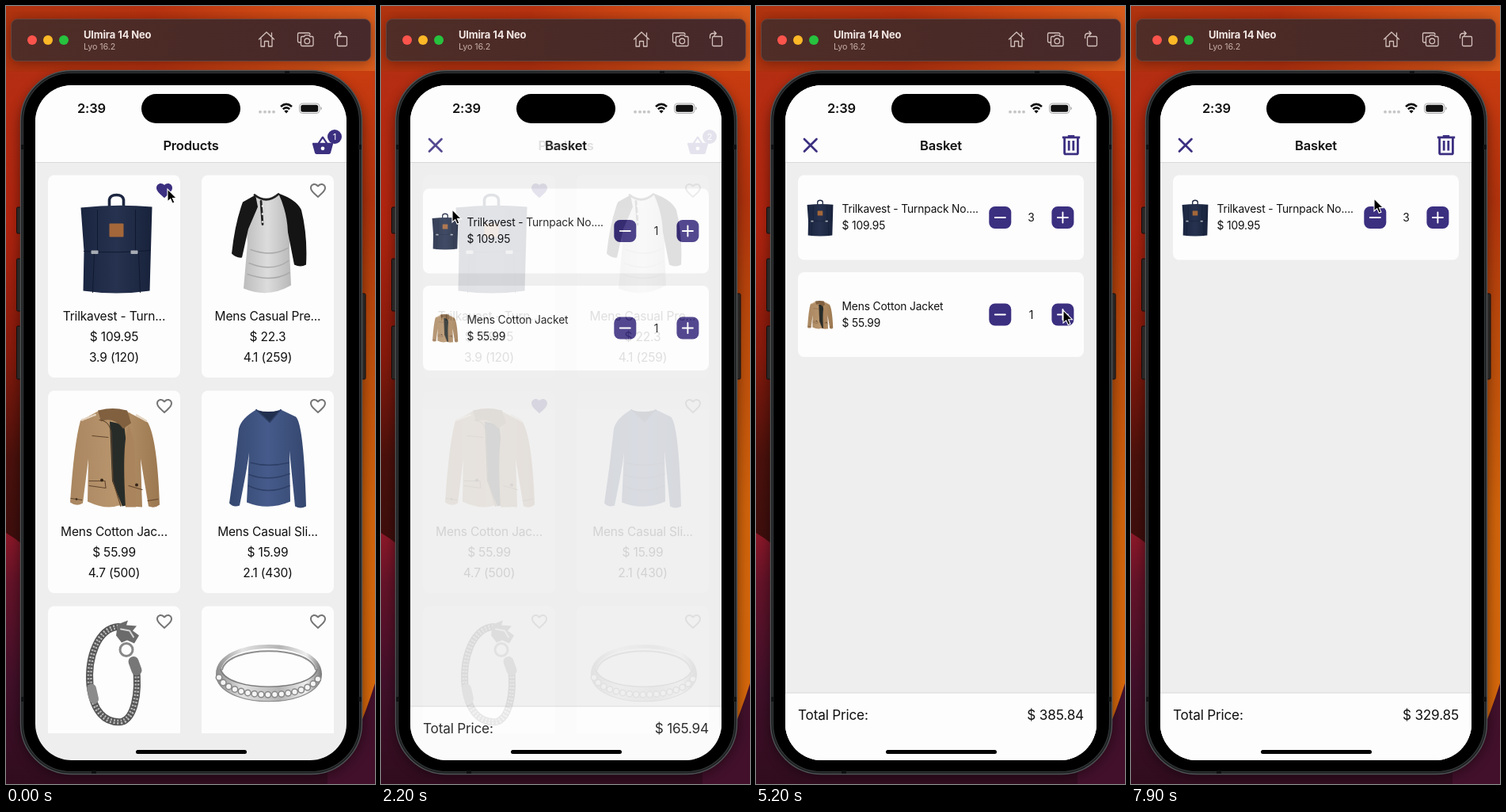
Animation of 466 by 982 pixels, one loop 8 s. Source, as an HTML page:

```html
<!DOCTYPE html>
<html lang="en">
<head>
<meta charset="utf-8">
<title>Shop app</title>
<style>
html, body { margin: 0; width: 100%; height: 100%; overflow: hidden; background: #2d0c20; }
svg { display: block; width: 466px; height: 982px; }
text { font-family: Inter, "Liberation Sans", sans-serif; font-size: 15.5px; letter-spacing: -.011em; fill: #111; }
.mid { text-anchor: middle; }
.end { text-anchor: end; }
.bold { font-weight: 600; font-size: 16.5px; }
.small { font-size: 13.8px; }
.total { font-size: 17.2px; }
.line { fill: none; stroke-linecap: round; stroke-linejoin: round; }
</style>
</head>
<body>
<svg id="stage" viewBox="0 0 466 982"></svg>
<script>
const PURPLE = '#3b2f80', WHITE = '#fdfdfd', GREY = '#eee';
const rect = (x, y, w, h, r, fill, more = '') =>
  `<rect x="${x}" y="${y}" width="${w}" height="${h}" rx="${r}" fill="${fill}" ${more}/>`;
const dot = (x, y, r, fill, more = '') => `<circle cx="${x}" cy="${y}" r="${r}" fill="${fill}" ${more}/>`;
const path = (d, fill, more = '') => `<path d="${d}" fill="${fill}" ${more}/>`;
const line = (d, color, width, more = '') =>
  `<path class="line" d="${d}" stroke="${color}" stroke-width="${width}" ${more}/>`;
const text = (x, y, s, cls = '', more = '') => `<text x="${x}" y="${y}" class="${cls}" ${more}>${s}</text>`;
const group = (more, ...parts) => `<g ${more}>${parts.join('')}</g>`;
const gradient = (id, dir, stops) => `<linearGradient id="${id}" ${dir}>` +
  stops.map(([o, c, a = 1]) => `<stop offset="${o}" stop-color="${c}" stop-opacity="${a}"/>`).join('') +
  '</linearGradient>';
const DOWN = 'x2="0" y2="1"';

const HEART = 'M12 21.35l-1.45-1.32C5.4 15.36 2 12.28 2 8.5 2 5.42 4.42 3 7.5 3c1.74 0 3.41.81 4.5 2.09C13.09 3.81 14.76 3 16.5 3 19.58 3 22 5.42 22 8.5c0 3.78-3.4 6.86-8.55 11.54z';
const HEART_HOLE = 'M12 18.65l-.1-.1C7.14 14.24 4 11.39 4 8.5 4 6.5 5.5 5 7.5 5c1.54 0 3.04.99 3.57 2.36h1.87C13.46 5.99 14.96 5 16.5 5c2 0 3.5 1.5 3.5 3.5 0 2.89-3.14 5.74-7.9 10.05z';
const BASKET = 'M17.21 9l-4.38-6.56c-.19-.28-.51-.42-.83-.42s-.64.14-.83.43L6.79 9H2c-.55 0-1 .45-1 1l.04.27 2.54 9.27c.23.84 1 1.46 1.92 1.46h13c.92 0 1.69-.62 1.93-1.46l2.54-9.27L23 10c0-.55-.45-1-1-1zM9 9l3-4.4L15 9zm3 8a2 2 0 1 1 0-4 2 2 0 0 1 0 4z';
const TRASH = 'M9 3V4H4V6H5V19A2 2 0 0 0 7 21H17A2 2 0 0 0 19 19V6H20V4H15V3ZM7 6H17V19H7ZM9 8V17H11V8ZM13 8V17H15V8Z';

const defs = '<defs>' +
  gradient('left', DOWN, [[0, '#a83212'], [.1, '#b52d12'], [.28, '#b0240f'], [.45, '#861a0c'], [.58, '#4c110c'], [.7, '#3c0e0d']]) +
  gradient('right', DOWN, [[0, '#d5500f'], [.1, '#c63a10'], [.25, '#b2330d'], [.42, '#bc4c0c'], [.65, '#d2640c'], [.9, '#d8690c']]) +
  gradient('top', '', [[0, '#b0330f'], [.4, '#b5310f'], [.75, '#d04a14'], [1, '#d95c1c']]) +
  gradient('plum', DOWN, [[0, '#8d1828'], [.2, '#651329'], [.6, '#42102a'], [1, '#300c1e']]) +
  gradient('bar', '', [[0, '#502d27'], [.5, '#4a2a26'], [1, '#47292c']]) +
  gradient('navy', '', [[0, '#1a2540'], [.5, '#26324f'], [1, '#18223b']]) +
  gradient('tan', '', [[0, '#a98660'], [.5, '#b8956d'], [1, '#9c7850']]) +
  gradient('blue', '', [[0, '#34476f'], [.5, '#465b8b'], [1, '#35476f']]) +
  gradient('cloth', '', [[0, '#bcbcbc'], [.5, '#dcdcdc'], [1, '#b8b8b8']]) +
  gradient('silver', '', [[0, '#8b8b8b'], [.25, '#e2e2e2'], [.6, '#b4b4b4'], [.85, '#efefef'], [1, '#777']]) +
  '<filter id="shade" x="-20%" y="-20%" width="140%" height="140%"><feGaussianBlur stdDeviation="8"/></filter>' +
  `<clipPath id="screen">${rect(37, 100, 393, 852, 46, '#000')}</clipPath>` +
  `<clipPath id="list">${rect(37, 198, 393, 720, 0, '#000')}</clipPath></defs>`;

const wallpaper = rect(0, 0, 233, 982, 0, 'url(#left)') + rect(233, 0, 233, 982, 0, 'url(#right)') +
  rect(0, 0, 466, 82, 0, 'url(#top)') +
  path('M0 665Q40 688 90 760V982H0Z', 'url(#plum)') +
  path('M466 855Q455 890 440 925L380 982H466Z', '#42102b') + rect(60, 950, 346, 32, 0, '#320c20') +
  rect(17, 88, 434, 884, 66, '#000', 'opacity=".45" filter="url(#shade)"');

const ICON = '#d3c2bd';
const titleBar = rect(6, 18, 455, 54, 9, '#000', 'opacity=".35" filter="url(#shade)"') +
  rect(6.5, 16.5, 454, 53, 8, 'url(#bar)', 'stroke="#6c443b"') +
  dot(33, 43, 6, '#fb544c') + dot(53, 43, 6, '#fdb827') + dot(73, 43, 6, '#27c23e') +
  text(98, 41, 'Ulmira 14 Neo', '', 'style="font-size:13px;font-weight:700;fill:#f3e8e5"') +
  text(98, 55, 'Lyo 16.2', '', 'style="font-size:10.8px;fill:#c6aea8"') +
  line('M319.500 42L329 33L338.500 42M322 40.500V51H326.500V44.500H331.500V51H336V40.500M335.500 38V34', ICON, 1.3) +
  line('M371.500 46H370Q368.500 46 368.500 44.500V35.500Q368.500 34 370 34H382Q384 34 384 36M374 38.500H376.500L378 36.800H382.500L384 38.500H386.500Q388 38.500 388 40V49Q388 50.500 386.500 50.500H374Q372.500 50.500 372.500 49V40Q372.500 38.500 374 38.500Z', ICON, 1.3) +
  dot(380.3, 44.3, 3.3, 'none', `stroke="${ICON}" stroke-width="1.3"`) +
  line('M420 38.500H429Q430.500 38.500 430.500 40V49Q430.500 50.500 429 50.500H420Q418.500 50.500 418.500 49V40Q418.500 38.500 420 38.500ZM415.500 40.500V38.500Q415.500 34.500 419.500 34.500H423M420.800 32L423.300 34.500L420.800 37', ICON, 1.3);

const side = (x, y, h) => rect(x, y, 6, h, 1.5, '#2b2726', 'stroke="#130d0c"');
const phone = side(13.5, 254, 33) + side(13.5, 319, 66) + side(13.5, 404, 67) + side(448, 363, 108) +
  rect(18.5, 81.5, 431, 888, 64, '#1d1f20', 'stroke="#4e5354" stroke-width="1.4"') +
  rect(21.5, 84.5, 425, 882, 61, '#000', 'stroke="#34383a" stroke-width="1.2"') +
  [[352, 82, 6, 4], [108, 965, 6, 4], [19, 175, 4, 6], [445, 175, 4, 6], [19, 872, 4, 6], [445, 872, 4, 6]]
    .map(a => rect(...a, 0, '#101112')).join('');

const statusBar = text(90, 135, '2:39', 'bold') + rect(171, 111, 125, 37, 18.5, '#000') +
  [321, 327, 332.500, 338].map(x => dot(x, 133.700, 1.900, '#c6c6c8')).join('') +
  line('M347 127Q354 120.800 361 127M349.800 130.200Q354 126.700 358.200 130.200', '#111', 2.600, 'style="stroke-linecap:butt"') +
  path('M354 135.500L351.300 132.500Q354 130.500 356.700 132.500Z', '#111') +
  rect(370.5, 123, 25.5, 12.5, 4, 'none', 'stroke="#a9a9ab"') + rect(372.3, 124.8, 21.9, 8.900, 2.500, '#111') +
  path('M397.300 127V131.500Q398.800 130.800 398.800 129.200T397.300 127Z', '#a9a9ab');

// Product pictures, each drawn around its own centre
const pictures = {
  bag: line('M-9 -43V-55Q-8 -61 0 -61T9 -55V-43', '#1d2741', 3.600) +
    path('M-45 -45Q0 -50 45 -46L42 60Q0 66 -42 60L-41 10Z', 'url(#navy)') +
    line('M-41 10Q0 13 42 9M-28 12L-30 62M28 12L30 62M-24 -42V10M24 -42V10', '#10192f', 1) +
    rect(-32, 9, 9, 4.500, 1, '#a7acb3') + rect(18, 9, 9, 4.500, 1, '#a7acb3') +
    rect(-9, -25, 18, 17, 1, '#a4673a'),
  raglan: path('M-17 -60Q-2 -48 13 -62L28 -45L27 10L29 53Q0 70 -31 57L-26 0L-29 -40Z', 'url(#cloth)') +
    path('M-16 -61L-32 -52Q-42 -25 -46 13Q-40 19 -33 18L-25 -18L-13 -46Z', '#171717') +
    path('M13 -63Q36 -55 42 -42Q50 -10 48 27Q41 31 33 27L25 -14Q24 -40 13 -63Z', '#141414') +
    line('M-17 -61Q-2 -49 13 -62M-9 -53L-7 -24', '#222', 2.800) +
    [-47, -37, -27].map(y => dot(-7, y, 1.300, '#eee')).join('') +
    line('M-24 25Q5 37 26 22M-26 39Q5 50 27 37M-22 8Q5 18 25 6', '#aaa', 1.500),
  jacket: path('M-21 -60L-43 -48Q-51 -20 -56 55Q-48 61 -40 56L-33 0L-34 54Q-10 65 5 59L35 61L33 0L43 60Q51 63 57 58Q54 -25 42 -46L15 -60L0 -55Z', 'url(#tan)') +
    path('M-6 -47L12 -43L25 56L10 60L-3 28Z', '#272c29') +
    path('M7 -54L20 -58L18 -42Q9 -20 14 61L27 61Q27 5 24 -26L18 -43Z', '#aa845c') +
    path('M-21 -61Q-2 -66 16 -61L21 -45L11 -38Q-2 -54 -17 -47Z', '#80603f') +
    line('M-19 -49Q-6 -48 -4 -32L-2 28L8 60M-32 34L-11 37L-12 28H-32M18 34L35 39M-28 -29L-8 -27M-55 50L-41 52M42 53L55 51', '#60452d', 1.100) +
    line('M-41 -49L-23 -56M28 -55L40 -48', '#e4d4c0', 2.500, 'stroke-dasharray="2 2"') +
    dot(-16, 27, 2, '#352619') + dot(28, 33, 2, '#352619') + dot(-48, 51, 1.300, '#352619'),
  sweater: path('M-15 -62Q0 -56 16 -62L35 -53Q45 -44 48 60Q41 64 34 60L27 -10L28 54Q0 66 -27 55L-24 -8Q-26 10 -36 59Q-44 62 -49 56Q-42 10 -37 -38Q-34 -51 -15 -62Z', 'url(#blue)') +
    path('M-14 -61Q0 -58 15 -61L2 -46Z', '#22304f') +
    line('M-15 -62L2 -46L16 -62M-24 20Q0 29 27 19M-25 34Q0 46 27 34M-22 5Q0 11 26 5', '#2d3f66', 1.500),
  bracelet: (d => line(d, '#555', 9) + line(d, '#b9b9b9', 6, 'stroke-dasharray="2 2.500" style="stroke-linecap:butt"') +
      line(d, '#606060', 1))('M6 -58C-20 -56 -33 -20 -30 16C-26 49 -11 64 10 62C25 58 33 28 28 -9') +
    line('M-28 20L-25 33', '#8b8b8b', 12) + line('M25 -14L29 -3', '#777', 13) +
    dot(16, -29, 8, 'none', 'stroke="#888" stroke-width="3"') +
    path('M5 -61L18 -66L16 -60L29 -59L24 -53L32 -47L26 -37L17 -41L10 -38L3 -47Z', '#6b6b6b') +
    line('M9 -55L20 -53L25 -45', '#d5d5d5', 2),
  ring: path('M-67 2C-67 -48 67 -48 67 2C67 48 -67 48 -67 2ZM-60 -5C-53 24 53 24 60 -5C51 -39 -51 -39 -60 -5Z', 'url(#silver)', 'fill-rule="evenodd"') +
    line('M-59 -4C-51 -35 51 -35 59 -4', '#8e8e8e', 2) +
    line('M-61 -4C-53 25 53 25 61 -4', '#777', 1.200) +
    line('M-63 6C-48 35 48 35 63 6', '#888', 9, 'stroke-dasharray="0 8.500"') +
    line('M-63 6C-48 35 48 35 63 6', '#f5f5f5', 6, 'stroke-dasharray="0 8.500"') +
    line('M-65 10C-50 45 50 45 65 10', '#8a8a8a', 1.200)
};
const picture = (name, x, y, scale = 1) => group(`transform="translate(${x} ${y}) scale(${scale})"`, pictures[name]);

const products = [
  ['bag', 'Trilkavest - Turn...', '$ 109.95', '3.9 (120)', 139.5],
  ['raglan', 'Mens Casual Pre...', '$ 22.3', '4.1 (259)', 331],
  ['jacket', 'Mens Cotton Jac...', '$ 55.99', '4.7 (500)', 137],
  ['sweater', 'Mens Casual Sli...', '$ 15.99', '2.1 (430)', 331],
  ['bracelet', '', '', '', 136],
  ['ring', '', '', '', 332]
];
const card = ([name, title, price, rating, px], i) => {
  const x = 53 + i % 2 * 194, y = 213.5 + (i >> 1) * 272;
  return rect(x, y, 167, 255.5, 8, WHITE) +
    group(`id="heart${i}" transform="translate(${x + 135} ${y + 7.5})"`) +
    picture(name, px, y + (i > 3 ? 84 : 86)) +
    [title, price, rating].map((s, k) => text(x + 83.5, y + 183.5 + k * 26.2, s, 'mid')).join('');
};
const homeBar = rect(164, 939, 140, 5, 2.5, '#000');
const header = rect(37, 100, 393, 97, 0, WHITE) + rect(37, 197, 393, 1, 0, '#d9d9d9');
const shop = rect(37, 100, 393, 852, 0, GREY) + header + text(233.5, 181.5, 'Products', 'bold mid') +
  path(BASKET, PURPLE, 'transform="translate(385.700 162) scale(1.190)"') + dot(415, 165, 9, PURPLE) +
  text(415, 169, '1', 'mid', 'id="badge" style="font-size:11px;fill:#fff"') +
  group('clip-path="url(#list)"', ...products.map(card));

const button = (id, x, sign) => group(`id="${id}"`, rect(x, 39.5, 28, 28, 7.5, PURPLE),
  line(`M${x + 7.5} 53.500h13` + (sign > 0 ? 'm-6.500 -6.500v13' : ''), '#fff', 1.900));
const row = (name, y, title, price, scale) => group(`id="${name}" transform="translate(0 ${y})"`,
  rect(53, 0, 361, 107, 8, WHITE), picture(name, 81, 54, scale),
  text(108.5, 47.5, title, 'small'), text(108.5, 68.5, price, 'small'),
  button(name + 'Minus', 294.3, -1), text(347.5, 58.5, '1', 'mid small', `id="${name}Count"`), button(name + 'Plus', 373.4, 1));
const basket = group('id="basket"', rect(37, 198, 393, 754, 0, GREY), header,
  text(233.5, 181.5, 'Basket', 'bold mid'), line('M61 168L76.500 183.500M76.500 168L61 183.500', PURPLE, 2.700),
  path(TRASH, PURPLE, 'id="trash" fill-rule="evenodd" transform="translate(381.200 158.800) scale(1.400)"'),
  group('id="sheet"',
    row('bag', 213.5, 'Trilkavest - Turnpack No....', '$ 109.95', .365), row('jacket', 336, 'Mens Cotton Jacket', '$ 55.99', .285),
    rect(37, 867, 393, 110, 0, WHITE), rect(37, 866.5, 393, 1, 0, '#d9d9d9'),
    text(53, 901, 'Total Price:', 'total'), text(414, 901, '', 'total end', 'id="total"')));

const stage = document.getElementById('stage');
stage.innerHTML = defs + wallpaper + titleBar + phone +
  group('clip-path="url(#screen)"', shop, basket, statusBar, homeBar) +
  path('M0 0V16L3.700 12.700L6.200 18.300L8.900 17.100L6.500 11.600H11.400Z', '#000', 'id="cursor" stroke="#fff" stroke-width="1.100"');

const $ = id => document.getElementById(id);
const clamp = v => Math.max(0, Math.min(1, v));

const cursorKeys = [
  [0, 204, 231], [100, 204, 275], [400, 203, 498], [600, 203, 498], [800, 202.5, 497], [1000, 203, 497],
  [1300, 456, 198], [1500, 404, 176], [1900, 402, 176], [2200, 90, 257], [2400, 92, 258], [3000, 388, 264],
  [3600, 390, 263], [4600, 390, 263], [5000, 388, 384], [5900, 388, 385], [6400, 317, 391], [6800, 315, 391],
  [7400, 315, 390], [7900, 307, 243]
];
function cursorAt(t) {
  const i = cursorKeys.findIndex(k => k[0] > t);
  if (i < 0) return cursorKeys.at(-1).slice(1);
  const [a, x, y] = cursorKeys[i - 1], [b, u, v] = cursorKeys[i];
  let p = (t - a) / (b - a);
  p = p * p * (3 - 2 * p);
  return [x + (u - x) * p, y + (v - y) * p];
}

const presses = {
  bagPlus: [[3400, 3700], [4200, 4500]], bagMinus: [],
  jacketPlus: [[5400, 5700]], jacketMinus: [[6700, 7000], [7200, 7400]]
};
const heart = filled => path(filled ? HEART : HEART + HEART_HOLE, filled ? PURPLE : '#757575', 'fill-rule="evenodd"');

let shown = -1;
function draw(now) {
  const t = Math.floor(now % 8000 / 100) * 100;
  requestAnimationFrame(draw);
  if (t === shown) return;
  shown = t;

  const liked = t >= 1000;
  products.forEach((_, i) => $('heart' + i).innerHTML = heart(i === 0 || i === 2 && liked));
  $('badge').textContent = liked ? 2 : 1;

  // The basket fades in while its content rises
  const left = 1 - clamp((t - 2000) / 400);
  $('basket').setAttribute('opacity', 1 - left ** 3);
  $('trash').setAttribute('opacity', clamp((t - 2200) / 200));
  $('sheet').setAttribute('transform', `translate(0 ${68 * left * left})`);

  const bags = 1 + (t >= 3500) + (t >= 4400);
  const jackets = t >= 7400 ? 0 : 1 + (t >= 5600 && t < 6900);
  $('bagCount').textContent = bags;
  $('jacketCount').textContent = jackets;
  $('jacket').style.display = jackets ? '' : 'none';
  $('total').textContent = '$ ' + (bags * 109.95 + jackets * 55.99).toFixed(2);
  for (const id in presses)
    $(id).setAttribute('opacity', presses[id].some(([a, b]) => t >= a && t < b) ? .63 : 1);

  $('cursor').setAttribute('transform', `translate(${cursorAt(t)})`);
}
const start = performance.now();
draw(0);
function tick() { }
requestAnimationFrame = (raf => f => raf(n => f(Math.max(0, n - start))))(requestAnimationFrame.bind(window));
</script>
</body>
</html>
```
